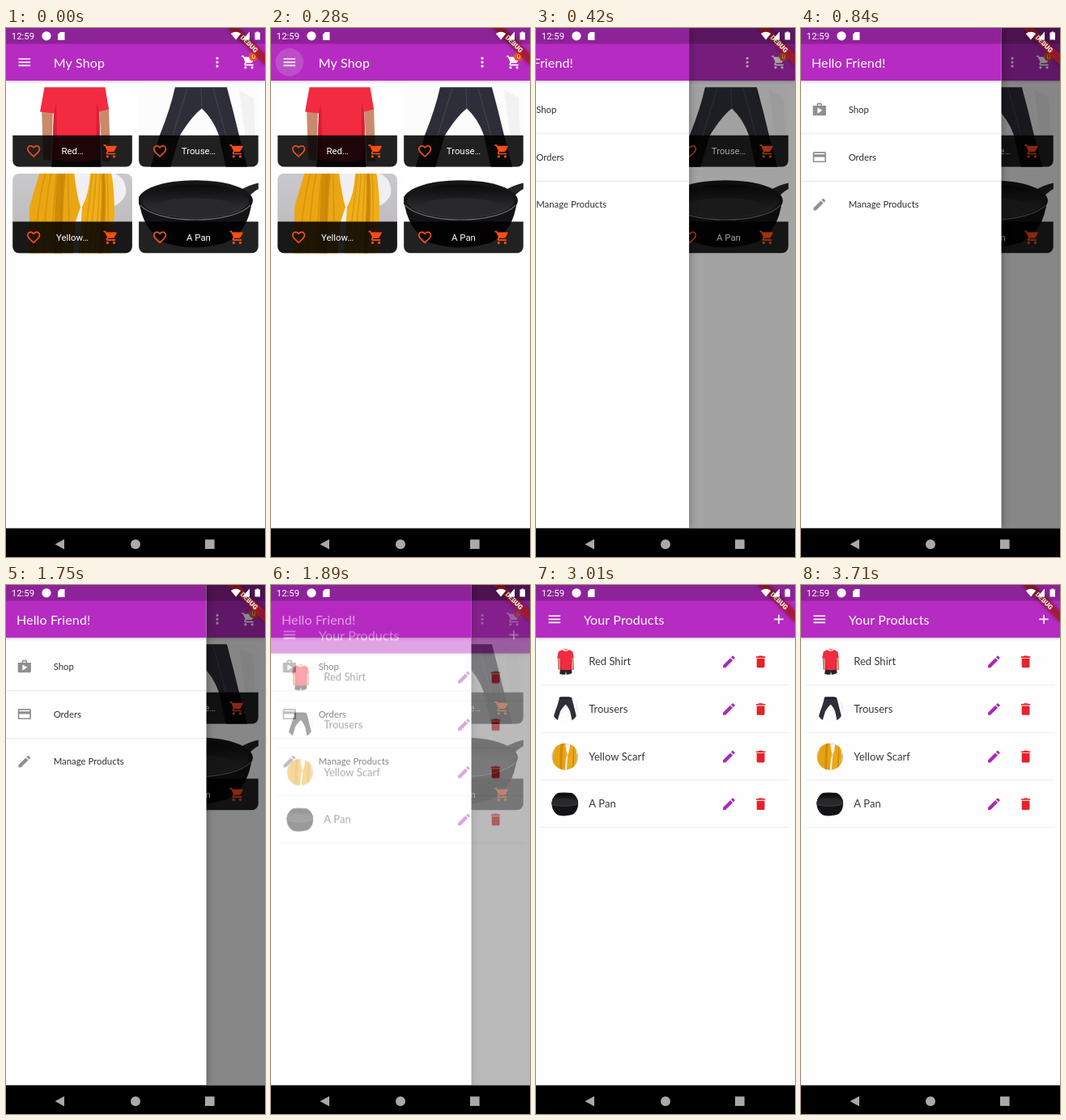
Recreate the animation shown at these times as an HTML page with a canvas. Size 320 by 654 pixels, loop 3.78 s.

```html
<!DOCTYPE html>
<html lang="en">
<head>
<meta charset="utf-8">
<title>Shop app</title>
<style>
html, body { margin: 0; width: 100%; height: 100%; overflow: hidden; background: #fff; }
canvas { display: block; }
</style>
</head>
<body>
<canvas id="stage" width="320" height="654"></canvas>
<script>
const W = 320, H = 654, APP_H = 618.5, LOOP = 3780, STEP = 70;
const DP = W / 393;
const BAR_H = 80 * DP, BAR_MID = 52 * DP, ROW = 72 * DP, DRAWER_W = 304 * DP;
const PURPLE = '#b62bc2', ORANGE = '#ff4e14', PAGE = '#fefefe';
const LATO = 'Lato, sans-serif', ROBOTO = 'Roboto, sans-serif';

const screen = document.getElementById('stage').getContext('2d');
const layerCanvas = document.createElement('canvas');
layerCanvas.width = W;
layerCanvas.height = H;
const layer = layerCanvas.getContext('2d');
let c = screen;

// Icons on a 24-unit grid
const ICONS = {
  menu: 'M3 18h18v-2H3zM3 13h18v-2H3zM3 6v2h18V6z',
  add: 'M19 13h-6v6h-2v-6H5v-2h6V5h2v6h6z',
  more: 'M12 8a2 2 0 1 0 0-4 2 2 0 0 0 0 4zM12 14a2 2 0 1 0 0-4 2 2 0 0 0 0 4zM12 20a2 2 0 1 0 0-4 2 2 0 0 0 0 4z',
  cart: 'M7 18a2 2 0 1 0 0 4 2 2 0 0 0 0-4zM1 2v2h2l3.6 7.6-1.35 2.45C4.5 15.4 5.5 17 7 17h12v-2H7.4c-.2 0-.3-.2-.2-.4l.9-1.6h7.45c.75 0 1.4-.4 1.75-1l3.6-6.5C21.2 4.8 20.8 4 20 4H5.2l-.95-2zM17 18a2 2 0 1 0 0 4 2 2 0 0 0 0-4z',
  heart: 'M16.5 3c-1.74 0-3.41.81-4.5 2.09C10.91 3.81 9.24 3 7.5 3 4.42 3 2 5.42 2 8.5c0 3.78 3.4 6.86 8.55 11.54L12 21.35l1.45-1.32C18.6 15.36 22 12.28 22 8.5 22 5.42 19.58 3 16.5 3zM12 18.65C7.14 14.24 4 11.39 4 8.5 4 6.5 5.5 5 7.5 5c1.54 0 3.04.99 3.57 2.36h1.87C13.46 5.99 14.96 5 16.5 5c2 0 3.5 1.5 3.5 3.5 0 2.89-3.14 5.74-8 10.15z',
  edit: 'M3 17.25V21h3.75L17.8 9.94l-3.75-3.75zM20.7 7.04c.4-.4.4-1 0-1.4l-2.34-2.35c-.4-.4-1-.4-1.4 0l-1.83 1.83 3.75 3.75z',
  trash: 'M6 19c0 1.1.9 2 2 2h8c1.1 0 2-.9 2-2V7H6zM19 4h-3.5l-1-1h-5l-1 1H5v2h14z',
  bag: 'M16 6V4c0-1.1-.9-2-2-2h-4c-1.1 0-2 .9-2 2v2H2v13c0 1.1.9 2 2 2h16c1.1 0 2-.9 2-2V6zM10 4h4v2h-4zM9 18V9l7.5 4z',
  card: 'M20 4H4C2.9 4 2 4.9 2 6v12c0 1.1.9 2 2 2h16c1.1 0 2-.9 2-2V6c0-1.1-.9-2-2-2zM20 18H4v-6h16zM20 8H4V6h16z'
};
for (const name in ICONS) ICONS[name] = new Path2D(ICONS[name]);

function at(x, y, scale, draw) {
  c.save();
  c.translate(x, y);
  c.scale(scale, scale);
  draw();
  c.restore();
}
function icon(name, x, y, color) {
  at(x, y, DP, () => {
    c.translate(-12, -12);
    c.fillStyle = color;
    c.fill(ICONS[name], 'evenodd');
  });
}
function text(str, x, y, size, family, color, align = 'left', weight = 400) {
  c.font = `${weight} ${size}px ${family}`;
  c.textAlign = align;
  c.fillStyle = color;
  c.fillText(str, x, y);
}
function rect(x, y, w, h, color) {
  c.fillStyle = color;
  c.fillRect(x, y, w, h);
}
function ellipse(x, y, rx, ry, color) {
  c.beginPath();
  c.ellipse(x, y, rx, ry, 0, 0, 7);
  c.fillStyle = color;
  c.fill();
}
function shape(d, color) {
  c.fillStyle = color;
  c.fill(new Path2D(d));
}
function line(d, width, color) {
  c.lineWidth = width;
  c.strokeStyle = color;
  c.stroke(new Path2D(d));
}
function vertical(y0, y1, ...colors) {
  const g = c.createLinearGradient(0, y0, 0, y1);
  colors.forEach((color, i) => g.addColorStop(i / (colors.length - 1), color));
  return g;
}

// Pictures, drawn around their own centre
function shirt() {
  rect(-80, -80, 160, 160, '#fff');
  shape('M-38-22L-24-22-26 42-36 40zM33-24L45-24 47 42 37 42z', '#c98a6b');
  shape('M-24 32H34L37 66H8L5 50 2 66H-28z', '#24242a');
  shape('M-14-72H20L8-50z', '#d9a488');
  shape('M-14-62Q4-44 22-62L40-52 45-22 33-19 35 40Q4 46-25 40L-23-17-40-19-34-52z', '#f32b41');
  shape('M-23-17L-25 40-18 41-20-30zM33-19L35 40 29 41 30-30z', '#d81f35');
}
function trousers() {
  rect(-80, -80, 160, 160, '#fcfcfc');
  shape('M50-46L68-36 70 14 58 14z', '#f2f2f3');
  shape('M-27-60H32Q42-24 50 10L62 56 36 60 25 10Q18-10 4-23Q-8-14-23 10L-38 60-60 52-48 10Q-32-30-27-60z', '#2d2e38');
  shape('M-27-60H32L34-50H-28z', '#1f2028');
  line('M-14-48L-38 30M18-48L42 40M3-48L4-23', 1.2, '#41424d');
}
function scarf() {
  rect(-80, -80, 160, 160, vertical(-50, 50, '#c9c8cc', '#b9b6b8'));
  shape('M-46-30Q0-70 50-50Q68-44 66-24Q60-10 46-8L42 80H-40z', '#f0eff1');
  shape('M-34-70Q-44-40-53-8L-54 80H-2L4 10 10-8Q4-26 0-70z', '#eba613');
  shape('M22-70Q24-30 12-8L6 80H46L52 0Q52-40 44-70z', '#f0ae18');
  shape('M-16-70Q-24-20-22 80H-12Q-14-10-6-70zM34-70Q40-20 28 80H34Q46-10 38-70z', '#d08c08');
  for (let i = 0; i < 5; i++) {
    line(`M${-30 + i * 6}-60Q${-44 + i * 10}-20 ${-48 + i * 11} 70M${26 + i * 4}-60Q${22 + i * 6}-20 ${10 + i * 8} 70`,
      1.6, 'rgba(180,115,0,.35)');
  }
}
function pan() {
  rect(-80, -80, 160, 160, '#fff');
  shape('M50-28Q64-36 76-38V-31Q66-28 58-14z', '#242426');
  shape('M-74-18Q-70 20-42 36Q-6 48 34 36Q62 22 66-16z', '#131315');
  ellipse(-4, -16, 71, 25, '#161618');
  ellipse(-4, -15, 66, 21, vertical(-36, 6, '#0a0a0b', '#39393c'));
  ellipse(-4, -7, 50, 12, '#29292c');
  line('M-72-10A71 25 0 0 0 64-10', 1.2, '#6c6d70');
}

const PRODUCTS = [
  { name: 'Red Shirt', label: 'Red…', photo: shirt, thumb: .24 },
  { name: 'Trousers', label: 'Trouse…', photo: trousers, thumb: .25 },
  { name: 'Yellow Scarf', label: 'Yellow…', photo: scarf, thumb: .28 },
  { name: 'A Pan', label: 'A Pan', photo: pan, thumb: .35 }
];
const LINKS = [['bag', 'Shop'], ['card', 'Orders'], ['edit', 'Manage Products']];

function appBar(title, x, width) {
  c.save();
  c.shadowColor = 'rgba(0,0,0,.22)';
  c.shadowBlur = 4;
  c.shadowOffsetY = 1;
  rect(0, 0, width, BAR_H, PURPLE);
  c.restore();
  c.letterSpacing = '0.12px';
  text(title, x, 49, 16, LATO, '#fff');
  c.letterSpacing = '0px';
}

function tile(product, x, y) {
  const w = 181.5 * DP, h = w / 1.5, barH = 48 * DP, mid = h - barH / 2;
  c.save();
  c.translate(x, y);
  c.beginPath();
  c.roundRect(0, 0, w, h, 10 * DP);
  c.clip();
  at(w / 2, h / 2, 1, product.photo);
  rect(0, h - barH, w, barH, 'rgba(0,0,0,.87)');
  icon('heart', 26, mid, ORANGE);
  icon('cart', 121.3, mid, ORANGE);
  text(product.label, w / 2, mid + 4.2, 14 * DP, ROBOTO, '#fff', 'center');
  c.restore();
}

function shopPage() {
  rect(0, 0, W, APP_H, PAGE);
  appBar('My Shop', 72 * DP, W);
  icon('menu', 28 * DP, BAR_MID, '#fff');
  icon('more', 261, BAR_MID, '#fff');
  icon('cart', 300, BAR_MID, '#fff');
  ellipse(306, 35, 6, 6, '#f0501f');
  text('0', 306, 38, 8, LATO, '#fff', 'center');
  PRODUCTS.forEach((p, i) =>
    tile(p, (10 + i % 2 * 191.5) * DP, BAR_H + 10 * DP + (i >> 1) * 131 * DP));
}

function ripple(progress) {
  if (progress <= 0 || progress >= 1) return;
  ellipse(28 * DP, BAR_MID, 6 + 13 * progress, 6 + 13 * progress, 'rgba(220,220,220,.2)');
}

function drawer(open) {
  if (open <= 0) return;
  rect(0, 0, W, APP_H, `rgba(0,0,0,${.47 * open})`);
  c.save();
  c.translate((open - 1) * DRAWER_W, 0);
  c.save();
  c.shadowColor = 'rgba(0,0,0,.35)';
  c.shadowBlur = 10;
  rect(0, 0, DRAWER_W, APP_H, '#fff');
  c.restore();
  c.beginPath();
  c.rect(0, 0, DRAWER_W, APP_H);
  c.clip();
  appBar('Hello Friend!', 16 * DP, DRAWER_W);
  LINKS.forEach(([name, label], i) => {
    const y = BAR_H + 44 * DP + i * ROW;
    if (i) rect(0, y - 36 * DP, DRAWER_W, 1, '#e6e6e6');
    icon(name, 28 * DP, y, '#8f8f8f');
    text(label, 72 * DP, y + 4.2, 14 * DP, LATO, '#2e2e2e');
  });
  c.restore();
}

function productsPage() {
  rect(0, 0, W, APP_H, PAGE);
  appBar('Your Products', 72 * DP, W);
  icon('menu', 28 * DP, BAR_MID, '#fff');
  icon('add', 300, BAR_MID, '#fff');
  PRODUCTS.forEach((p, i) => {
    const y = BAR_H + 36.5 * DP + i * ROW;
    c.save();
    c.beginPath();
    c.arc(35.8, y, 20 * DP, 0, 7);
    c.clip();
    at(35.8, y, p.thumb, p.photo);
    c.restore();
    text(p.name, 65.2, y + 4.6, 16 * DP, LATO, '#383838');
    icon('edit', 238.4, y, '#a82ab5');
    icon('trash', 277.6, y, '#e8212b');
    rect(8 * DP, y + 28.4, W - 16 * DP, 1, '#ececec');
  });
}

function debugBanner() {
  c.save();
  c.translate(W, 0);
  c.rotate(Math.PI / 4);
  c.save();
  c.shadowColor = 'rgba(0,0,0,.5)';
  c.shadowBlur = 5;
  rect(-40 * DP, 28 * DP, 80 * DP, 12 * DP, 'rgba(183,28,28,.7)');
  c.restore();
  text('DEBUG', 0, 37.4 * DP, 10.2 * DP, ROBOTO, '#fff', 'center', 900);
  c.restore();
}

function systemBars() {
  rect(0, 0, W, 24 * DP, 'rgba(0,0,0,.22)');
  text('12:59', 6.8, 14, 11.4, ROBOTO, '#fff');
  ellipse(50, 9.8, 5.6, 5.6, '#fff');
  shape('M67 5H72.5V15H64V8z', '#fff');
  shape('M277.8 7Q284 2.5 290.2 7L284 14.6z', '#fff');
  shape('M301 4.5V14.5H292z', '#fff');
  shape('M307.5 5.5H309.5V4.5H312V5.5H314V14.6H307.5z', '#fff');
  rect(0, APP_H, W, H - APP_H, '#000');
  shape('M60.5 638.2L72 632V644.5z', '#a9a9a9');
  ellipse(160, 638.2, 6, 6, '#a9a9a9');
  rect(246, 632.4, 11.6, 11.6, '#a9a9a9');
}

const clamp = v => Math.min(1, Math.max(0, v));

function bezier(x1, y1, x2, y2) {
  const axis = (a, b, s) => 3 * a * s * (1 - s) ** 2 + 3 * b * s * s * (1 - s) + s ** 3;
  return x => {
    let lo = 0, hi = 1;
    for (let i = 0; i < 24; i++) {
      const mid = (lo + hi) / 2;
      if (axis(x1, x2, mid) < x) lo = mid; else hi = mid;
    }
    return axis(y1, y2, lo);
  };
}
const easeIn = bezier(.42, 0, 1, 1);
const fastOutSlowIn = bezier(.4, 0, .2, 1);

// Critically damped spring
function springOpen(ms) {
  if (ms <= 0) return 0;
  const k = Math.sqrt(500) * ms / 1000;
  const v = 1.01 * (1 - (1 + k) * Math.exp(-k));
  return v > .985 ? 1 : v;
}

function render(t) {
  const route = clamp((t - 1742) / 247);
  c = screen;
  rect(0, 0, W, H, PAGE);
  if (route < 1) {
    shopPage();
    ripple((t - 20) / 300);
    drawer(springOpen(t - 298));
  }
  if (route > 0) {
    c = layer;
    productsPage();
    c = screen;
    c.globalAlpha = easeIn(route);
    c.drawImage(layerCanvas, 0, (1 - fastOutSlowIn(route)) * APP_H / 4);
    c.globalAlpha = 1;
  }
  debugBanner();
  systemBars();
}

const start = performance.now();
function tick() {
  const t = (performance.now() - start) % LOOP;
  render(Math.floor(t / STEP) * STEP);
  requestAnimationFrame(tick);
}
tick();
</script>
</body>
</html>
```
